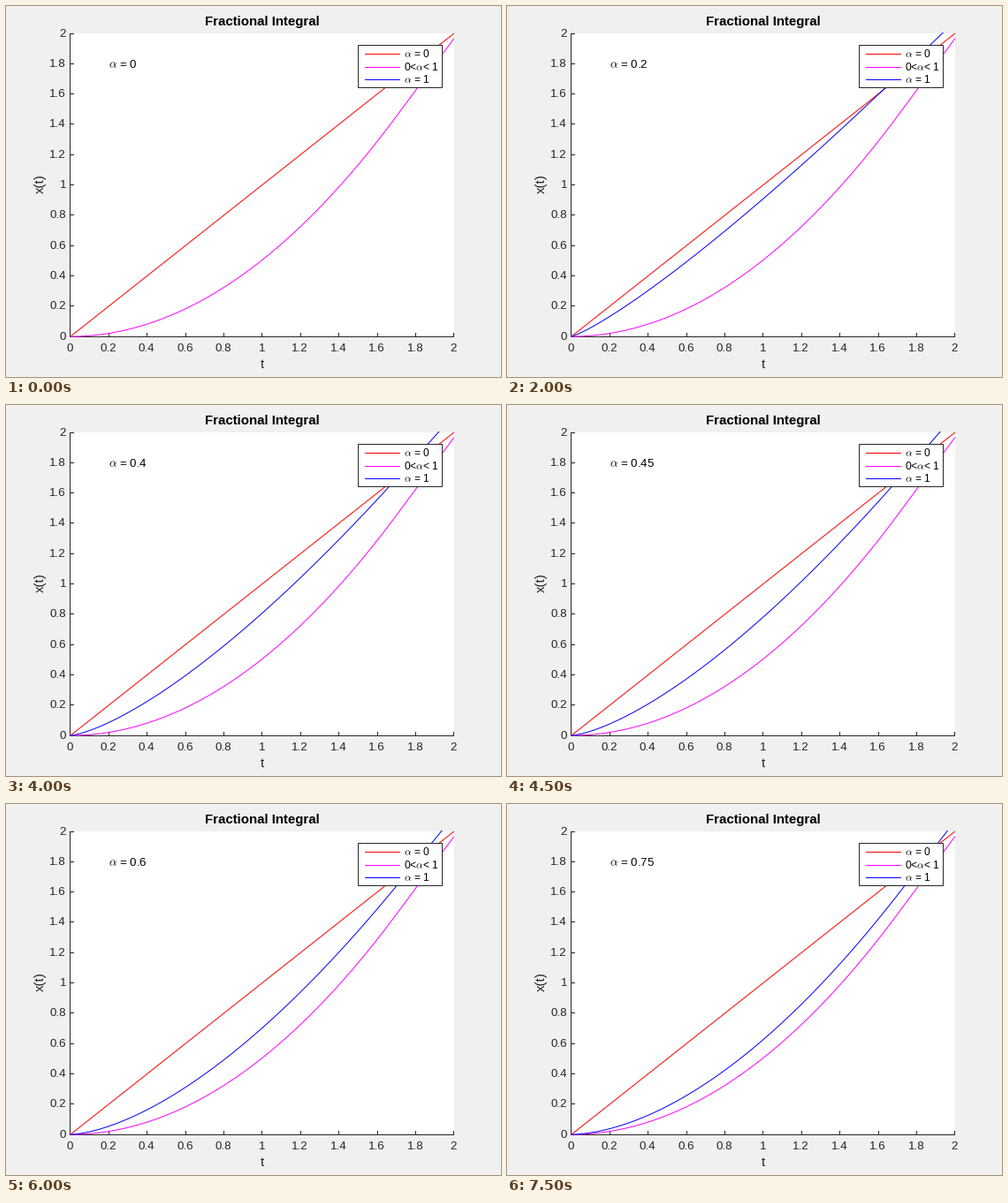
Animation, 560 px wide and 420 px high, one loop 8000 ms. Source, as a matplotlib script:

```python
import numpy as np
import matplotlib.pyplot as plt
from matplotlib.animation import FuncAnimation
from matplotlib.patches import Rectangle

W, H, DPI = 560, 420, 80
PX = 72 / DPI                       # one pixel in points
LEFT, RIGHT, TOP, BOTTOM = 72.8, 506.8, 31.0, 374.2
STEP, MEMORY = 0.01, 171            # step size and number of kept weights
FRAMES, INTERVAL = 16, 500
GREY = "#262626"

plt.rcParams["font.family"] = "Liberation Sans"
plt.rcParams["mathtext.fontset"] = "cm"

fig = plt.figure(figsize=(W / DPI, H / DPI), dpi=DPI, facecolor="#f0f0f0")
ax = fig.add_axes([0, 0, 1, 1])
ax.set_xlim(0, W)
ax.set_ylim(H, 0)
ax.axis("off")

t = np.arange(201) * STEP


def to_x(v):
    return LEFT + (RIGHT - LEFT) * v / 2


def to_y(v):
    return BOTTOM - (BOTTOM - TOP) * v / 2


def frac_integral(alpha):
    """Gruenwald-Letnikov integral of x(t) = t with a limited memory."""
    j = np.arange(1, MEMORY)
    weights = np.append(1, np.cumprod((j - 1 + alpha) / j))
    return np.convolve(t, weights)[:len(t)] * STEP ** alpha


def label(x, y, s, px, color="black", **kw):
    kw = {"ha": "left", "va": "baseline", **kw}
    return ax.text(x, y, s, size=px * PX, color=color, zorder=8, **kw)


def stroke(xs, ys, color=GREY, z=2):
    """Straight line through whole pixels, both ends included."""
    ax.plot(xs, ys, color=color, lw=PX, zorder=z, snap=True,
            solid_capstyle="projecting")


def curve(values, color, z):
    line, = ax.plot(to_x(t), to_y(values), color=color, lw=PX, zorder=z,
                    snap=False, solid_capstyle="butt")
    line.set_clip_path(clip)
    return line


clip = Rectangle((60, 30), 448, 346, transform=ax.transData)
ax.add_patch(Rectangle((73, 31), 434, 343, fc="white", ec="none", zorder=1))

# Axes, ticks and their labels
stroke([72, 72], [31, 374])
stroke([72, 506], [374, 374])
for k in range(11):
    v = round(0.2 * k, 1)
    x, y = int(to_x(v)), int(to_y(v))
    stroke([x, x], [370, 374])
    stroke([72, 76], [y, y])
    label(to_x(v) - 0.5, 391, f"{v:g}", 13.33, GREY, ha="center")
    label(68, y + 4, f"{v:g}", 13.33, GREY, ha="right")

label(290, 22, "Fractional Integral", 15, weight="bold", ha="center")
label(290, 410, "t", 15, GREY, ha="center")
label(43, 201.5, "x(t)", 15, GREY, ha="center",
      rotation=90, rotation_mode="anchor")

curve(t, "#ff0000", 3)
curve(frac_integral(1), "#ff00ff", 4)
moving = curve(np.full(len(t), np.nan), "#0000ff", 5)

# Legend
ax.add_patch(Rectangle((398, 44), 95, 48, fc="white", ec=GREY,
                       lw=PX, zorder=6))
entries = [(54, "#ff0000", r"$\alpha$ = 0"),
           (69, "#ff00ff", r"0<$\alpha$< 1"),
           (83, "#0000ff", r"$\alpha$ = 1")]
for y, color, name in entries:
    stroke([406, 445], [y, y], color, 7)
    label(450, y + 4, name, 12)

note = label(116, 70, "", 13.33)


def update(i):
    alpha = round(0.05 * i, 2)
    values = frac_integral(alpha) if i else np.full(len(t), np.nan)
    moving.set_ydata(to_y(values))
    note.set_text(rf"$\alpha$ = {alpha:g}")
    return moving, note


anim = FuncAnimation(fig, update, frames=FRAMES, interval=INTERVAL,
                     repeat=True, repeat_delay=0)
plt.show()
```
